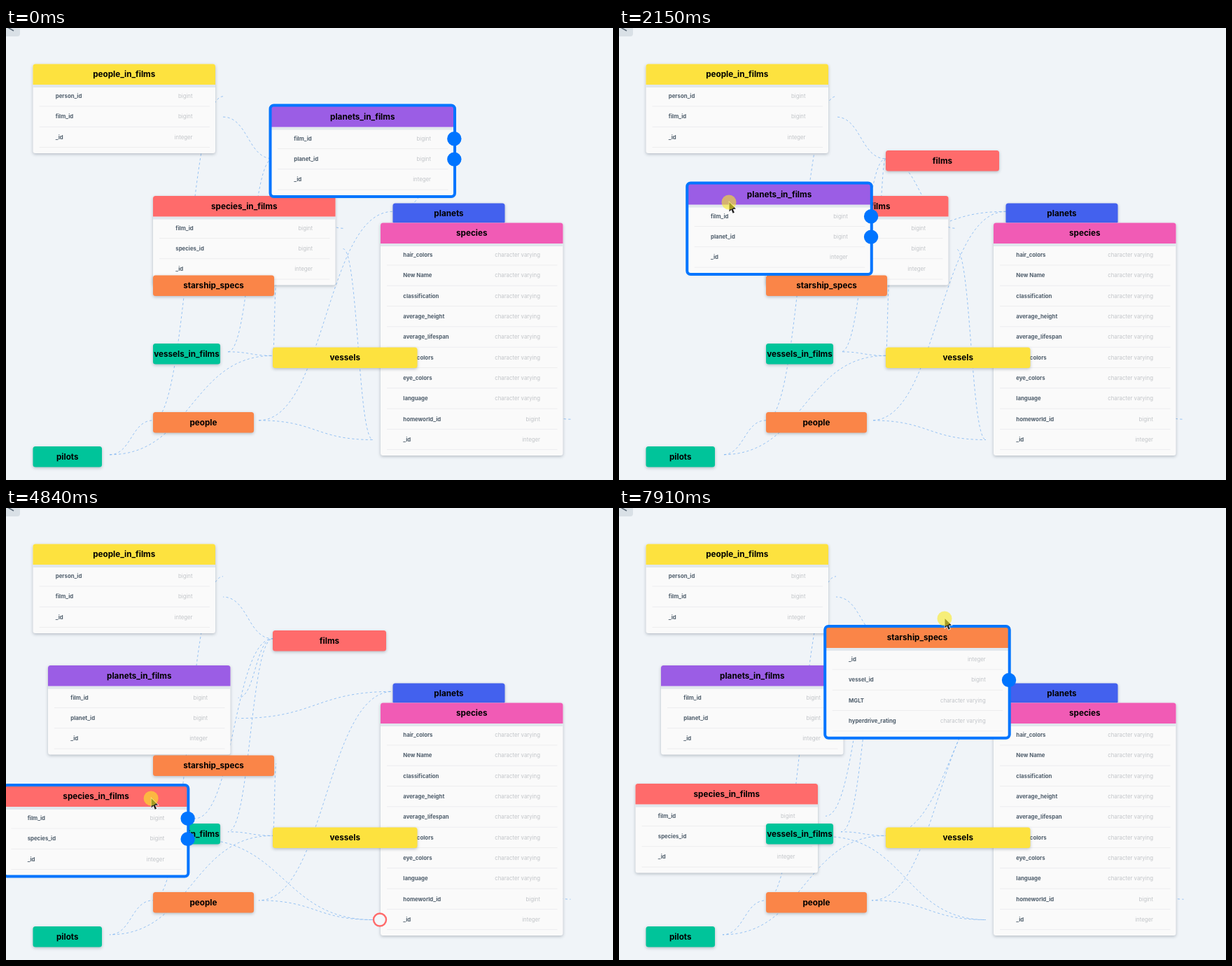
An HTML page with a canvas that plays this animation: 867x646 px, repeating every 7.99 s.

```html
<!DOCTYPE html>
<html lang="en">
<head>
<meta charset="utf-8">
<title>Schema diagram</title>
<style>
html, body { margin: 0; width: 100%; height: 100%; overflow: hidden; background: #f0f4f8; }
canvas { display: block; width: 867px; height: 646px; }
</style>
</head>
<body>
<canvas id="stage"></canvas>
<script>
const W = 867, H = 646, LOOP = 7990;
const HEAD = 29.5, ROW = 29.3, WIDE = 260.5, LAG = 250;
const BG = '#f0f4f8', BLUE = '#0075ff', CORAL = '#ff6b6b', YELLOW = '#fde23f',
  ORANGE = '#fa8548', GREEN = '#00c49a', PURPLE = '#9b5de5', ROYAL = '#4361ee', PINK = '#f15bb5';
const canvas = document.getElementById('stage');
const ctx = canvas.getContext('2d');
const dpr = window.devicePixelRatio || 1;
canvas.width = W * dpr;
canvas.height = H * dpr;

// a node is a full table when it has rows, otherwise a bar of width w
const table = (name, color, x, y, rows) => ({ name, color, x, y, w: WIDE, gap: 11, rows });
const bar = (name, color, x, y, w, gap = 11) => ({ name, color, x, y, w, gap });
const typed = (type, ...keys) => keys.map(k => [k, type]);
const text = (...keys) => typed('character varying', ...keys);
const big = (...keys) => typed('bigint', ...keys);
const id = typed('integer', '_id');

// from back to front
const nodes = [
  table('people_in_films', YELLOW, 38.5, 51.5, [...big('person_id', 'film_id'), ...id]),
  table('planets_in_films', PURPLE, 379, 112, [...big('film_id', 'planet_id'), ...id]),
  table('species_in_films', CORAL, 210, 240, [...big('film_id', 'species_id'), ...id]),
  bar('starship_specs', ORANGE, 210, 353.5, 173, 3),
  bar('films', CORAL, 381, 175, 162),
  bar('planets', ROYAL, 552.5, 250.5, 160),
  table('species', PINK, 535, 278.5, [
    ...text('hair_colors', 'New Name', 'classification', 'average_height', 'average_lifespan',
      'skin_colors', 'eye_colors', 'language'), ...big('homeworld_id'), ...id]),
  bar('vessels_in_films', GREEN, 210, 451, 96),
  bar('vessels', YELLOW, 381, 456.5, 206.5),
  bar('people', ORANGE, 210, 549, 144, 7),
  bar('pilots', GREEN, 38.5, 598, 98.5)
];
const byName = Object.fromEntries(nodes.map(n => [n.name, n]));
const closedSpecs = { ...byName.starship_specs };
const openSpecs = table('starship_specs', ORANGE, 210, 337,
  [...id, ...big('vessel_id'), ...text('MGLT', 'hyperdrive_rating')]);

// "table.column > table.column"; bars have no columns
const edges = [
  'people_in_films.person_id > people', 'people_in_films.film_id > films',
  'planets_in_films.film_id > films', 'planets_in_films.planet_id > planets',
  'species_in_films.film_id > films', 'species_in_films.species_id > species._id',
  'starship_specs.vessel_id > vessels', 'species.homeworld_id > planets',
  'vessels_in_films > films', 'vessels_in_films > vessels',
  'people > planets', 'people > species._id', 'pilots > people', 'pilots > vessels'
].map(s => s.split(' > ').map(end => end.split('.')));

// pointer way points: time, x, y
const pointer = [
  [0, 476, 136], [1285, 476, 136], [1610, 319, 178], [1900, 196, 247], [2150, 157, 249],
  [2750, 157, 249], [3350, 400, 260], [3520, 400, 260], [4480, 185, 418], [5000, 213.5, 414],
  [5500, 213.5, 414], [6300, 357, 374], [6600, 357, 374], [6840, 360, 362],
  [7000, 360, 362], [7910, 465, 158]
];
const drags = [
  { name: 'planets_in_films', from: 80, to: 2650 },
  { name: 'species_in_films', from: 3430, to: 5300 },
  { name: 'starship_specs', from: 6930, to: LOOP + LAG }
];
const SELECT_SPECIES = 3530, SELECT_SPECS = 6260, OPEN = 6470;
const clicks = [{ from: 6260, to: 6330 }, { from: 6400, to: OPEN }];
const home = Object.fromEntries(nodes.map(n => [n.name, [n.x, n.y]]));
home.starship_specs = [openSpecs.x, openSpecs.y];

// monotone cubic through the way points, at rest on holds and turns
function slope(i, axis) {
  const a = pointer[i - 1], b = pointer[i], c = pointer[i + 1];
  if (!a || !c) return 0;
  const p = (b[axis] - a[axis]) / (b[0] - a[0]);
  const q = (c[axis] - b[axis]) / (c[0] - b[0]);
  return p * q > 0 ? 2 * p * q / (p + q) : 0;
}

function pointerAt(t) {
  const i = pointer.findIndex(p => p[0] > t);
  if (i < 0) return pointer[pointer.length - 1].slice(1);
  const a = pointer[i - 1], b = pointer[i], d = b[0] - a[0], k = (t - a[0]) / d;
  return [1, 2].map(axis => a[axis] + (b[axis] - a[axis]) * k * k * (3 - 2 * k)
    + d * k * (1 - k) * ((1 - k) * slope(i - 1, axis) - k * slope(i, axis)));
}

// a dragged table trails the pointer
function moveDragged({ name, from, to }, t) {
  const [x0, y0] = pointerAt(from);
  const [x, y] = pointerAt(Math.min(Math.max(t - LAG, from), to));
  byName[name].x = home[name][0] + x - x0;
  byName[name].y = home[name][1] + y - y0;
}

const rowY = (n, i) => n.y + 46.3 + ROW * i;
const colY = (n, key) => n.rows ? rowY(n, n.rows.findIndex(r => r[0] === key)) : n.y + 11.8;

function box(x, y, w, h, r) {
  ctx.beginPath();
  ctx.roundRect(x, y, w, h, r);
}

function disc(x, y, r, fill) {
  ctx.beginPath();
  ctx.arc(x, y, r, 0, 7);
  ctx.fillStyle = fill;
  ctx.fill();
}

function trace(points) {
  ctx.beginPath();
  points.forEach(p => ctx.lineTo(...p));
}

function label(str, x, y, font, color, align) {
  ctx.font = font + ' Inter, sans-serif';
  ctx.fillStyle = color;
  ctx.textAlign = align;
  ctx.fillText(str, x, y);
}

function handle(x, y, color, fill = '#f4f7fa') {
  disc(x, y, 9, fill);
  ctx.strokeStyle = color;
  ctx.lineWidth = 2.4;
  ctx.stroke();
}

function drawEdge([[from, key], [to, toKey]]) {
  const a = byName[from], b = byName[to];
  const sx = a.x + a.w + a.gap, sy = colY(a, key);
  const tx = b.rows ? b.x - 11 : b.x, ty = colY(b, toKey);
  const mid = (sx + tx) / 2;
  ctx.beginPath();
  ctx.moveTo(sx, sy);
  ctx.bezierCurveTo(mid, sy, mid, ty, tx, ty);
  ctx.stroke();
}

function drawEdges(t) {
  ctx.save();
  ctx.strokeStyle = '#7fb5f1';
  ctx.lineWidth = 0.8;
  ctx.setLineDash([3.25, 3.25]);
  ctx.lineDashOffset = 6.5 * (1 - t / 500 % 1);
  edges.forEach(drawEdge);
  ctx.restore();
}

function drawNode(n) {
  const { name, color, x, y, w, rows } = n;
  const h = n.h = rows ? 39.6 + ROW * rows.length : HEAD;
  ctx.save();
  ctx.shadowColor = 'rgba(40,55,75,.3)';
  ctx.shadowBlur = 4 * dpr;
  ctx.shadowOffsetY = 1.5 * dpr;
  ctx.fillStyle = rows ? '#fafafa' : color;
  box(x, y, w, h, 3.5);
  ctx.fill();
  ctx.restore();
  if (rows) {
    ctx.fillStyle = '#e1e7ed';
    ctx.fillRect(x, y + HEAD, w, 4);
    ctx.fillStyle = color;
    box(x, y, w, HEAD, [3.5, 3.5, 0, 0]);
    ctx.fill();
    rows.forEach(([key, type], i) => {
      const cy = rowY(n, i);
      label(key, x + 32.3, cy, '700 7.8px', '#4f5e6c', 'left');
      label(type, x + 228, cy, '400 7.8px', '#c2c5c9', 'right');
      ctx.fillStyle = '#ececee';
      ctx.fillRect(x + 9, cy + 13.7, w - 17, 0.9);
    });
  }
  label(name, x + w / 2, y + 15, '700 11.7px', '#000', 'center');
}

function drawSelection(n) {
  ctx.strokeStyle = BLUE;
  ctx.lineWidth = 4;
  box(n.x - 1.5, n.y - 1.5, n.w + 3, n.h + 3, 5);
  ctx.stroke();
  if (!n.rows) return;
  edges.filter(([[from]]) => from === n.name)
    .forEach(([[, key]]) => handle(n.x + n.w + 0.8, colY(n, key), BLUE, BLUE));
}

function drawHover(n) {
  const cy = rowY(n, 0);
  ctx.fillStyle = '#5ba4f5';
  ctx.fillRect(n.x + 9, cy + 13.7, n.w - 17, 0.9);
  handle(n.x - 1.5, cy, BLUE);
  handle(n.x + n.w + 0.8, cy, BLUE);
}

function drawButton() {
  ctx.fillStyle = '#d9e0e6';
  box(-10, -10, 30, 22, 4);
  ctx.fill();
  ctx.strokeStyle = '#5d6b78';
  ctx.lineWidth = 1.6;
  trace([[11, -5], [3, -0.5], [11, 4]]);
  ctx.stroke();
}

function drawPointer(t) {
  const [x, y] = pointerAt(t);
  ctx.save();
  ctx.translate(x + 0.5, y);
  trace([[0, 0], [0, 13.5], [3, 10.8], [5.1, 15.8], [7.4, 14.8], [5.3, 9.9], [9.5, 9.6]]);
  ctx.closePath();
  ctx.strokeStyle = 'rgba(255,255,255,.85)';
  ctx.lineWidth = 1.6;
  ctx.stroke();
  ctx.fillStyle = '#222';
  ctx.fill();
  ctx.restore();
  const down = [...drags, ...clicks].some(p => t >= p.from && t < p.to);
  if (down) disc(x, y, 10.5, 'rgba(250,234,36,.6)');
}

function draw(t) {
  const open = t >= OPEN;
  Object.assign(byName.starship_specs, { rows: null }, open ? openSpecs : closedSpecs);
  drags.forEach(d => (open || d.name !== 'starship_specs') && moveDragged(d, t));
  const active = byName[t < SELECT_SPECIES ? 'planets_in_films'
    : t < SELECT_SPECS ? 'species_in_films' : 'starship_specs'];

  ctx.setTransform(dpr, 0, 0, dpr, 0, 0);
  ctx.textBaseline = 'middle';
  ctx.fillStyle = BG;
  ctx.fillRect(0, 0, W, H);
  drawEdges(t);
  nodes.filter(n => n !== active).forEach(drawNode);
  if (active.name === 'species_in_films') {
    const { species } = byName;
    handle(species.x - 1, colY(species, '_id'), CORAL);
  }
  drawNode(active);
  drawSelection(active);
  if (open && t < 7000) drawHover(active);
  drawButton();
  if (t >= drags[0].from) drawPointer(t);
}

function tick() {
  draw(performance.now() % LOOP);
  requestAnimationFrame(tick);
}
tick();
</script>
</body>
</html>
```
